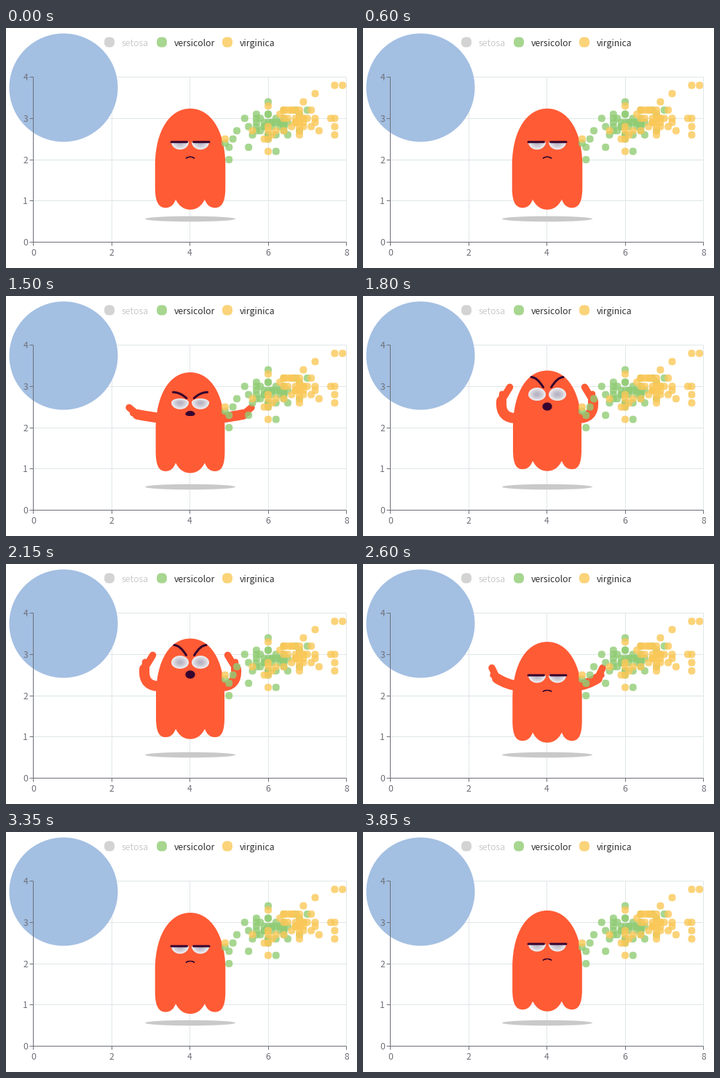
A matplotlib script for the animation above (3900 ms loop, 482 by 330 pixels).

```python
import numpy as np
import matplotlib.pyplot as plt
from matplotlib.animation import FuncAnimation
from matplotlib.patches import Circle, Ellipse, PathPatch
from matplotlib.path import Path

W, H, DPI = 482, 330, 64
PX = 72 / DPI  # points per pixel
STEP, FRAMES = 50, 78
CX = 253

GREEN, YELLOW, GREY = "#91cc75", "#fac858", "#d3d3d3"
BODY, INK, AXIS, GRID = "#ff5b35", "#35052f", "#6e7079", "#e0e6e8"
FONT = "Noto Sans CJK JP"

# time, lift in px, anger, arm raise in degrees, arm reach
KEYS = [(1150, 0, 0, 0, 0), (1250, -5, 0, 0, 0), (1500, 6, 0.35, 9, 1),
        (1750, 8.5, 1, 46, 1), (2250, 8.5, 1, 46, 1), (2600, 4, 0, 20, 0.95),
        (2750, -5, 0, 0, 1), (2900, 0, 0, 0, 0)]


def pose(t):
    """Lift, anger, raise and reach, eased between the keys."""
    keys = np.array(KEYS)
    t = np.clip(t, keys[0, 0], keys[-1, 0])
    i = min(np.searchsorted(keys[:, 0], t, side="right"), len(keys) - 1)
    a, b = keys[i - 1], keys[i]
    u = (t - a[0]) / (b[0] - a[0])
    return (a + (b - a) * u * u * (3 - 2 * u))[1:]


def bob(t):
    phase = min(t, 1100) + 50 if t < 2000 else t - 3350
    weight = np.interp(t, [1150, 1250, 2800, 2950], [1, 0, 0, 1])
    return weight * 2.5 * (1 - np.cos(2 * np.pi * phase / 700))


def iris_cloud(rng, mean, sd, corr, low, high, count):
    """Correlated normal points on a 0.1 grid, kept within a window."""
    cov = corr * sd[0] * sd[1]
    pts = rng.multivariate_normal(mean, [[sd[0] ** 2, cov], [cov, sd[1] ** 2]], 400)
    pts = pts.round(1)
    inside = ((pts >= low) & (pts <= high)).all(axis=1)
    return pts[inside][:count]


def loop(x, y, rx, up, down, power=1.0):
    """Closed oval with its own upper and lower height."""
    a = np.linspace(0, 2 * np.pi, 41)
    c, s = np.cos(a), np.sin(a)
    c, s = (np.sign(v) * np.abs(v) ** power for v in (c, s))
    return np.c_[x + rx * c, y + np.where(s > 0, down, up) * s]


def quad(*pts):
    return Path(pts, [Path.MOVETO, Path.CURVE3, Path.CURVE3])


def body_path(top, bottom, half):
    left = [(0, top), (-28, top), (1 - half, top + 30), (-half, top + 75),
            (-half, top + 90), (-half, bottom - 45), (-half, bottom - 30),
            (-half, bottom - 10), (-43, bottom - 2.5), (-34, bottom - 2.5),
            (-26, bottom - 2.5), (-22, bottom - 8), (-20, bottom - 14),
            (-15, bottom - 4), (-8, bottom), (0, bottom)]
    pts = left + [(-x, y) for x, y in left[-2::-1]]
    return Path(np.array(pts) + (CX, 0), [Path.MOVETO] + [Path.CURVE4] * (len(pts) - 1))


def arm_points(lift_deg, reach):
    """Shoulder, elbow, wrist, fingertip and thumb of the right arm."""
    a, b = np.radians([lift_deg, 20 + 2.2 * lift_deg])
    shoulder = np.array([30 + 10 * reach, 168])
    wrist = shoulder + 33 * reach * np.array([np.cos(a), -np.sin(a)])
    bulge = 0.009 * lift_deg ** 2 * reach
    elbow = (shoulder + wrist) / 2 + bulge * np.array([np.sin(a), np.cos(a)])
    finger = reach * (13 + 0.2 * lift_deg) * np.array([np.cos(b), -np.sin(b)])
    thumb = wrist + 0.4 * finger + 0.2 * np.array([-finger[1], finger[0]])
    return np.array([shoulder, elbow, wrist, wrist + finger, thumb])


fig = plt.figure(figsize=(W / DPI, H / DPI), dpi=DPI, facecolor="white")
ax = fig.add_axes([0, 0, 1, 1])
ax.set(xlim=(0, W), ylim=(H, 0))
ax.axis("off")


def px(v):
    return 37.5 + 53.75 * v


def py(v):
    return 294.5 - 56.75 * v


def line(xs, ys, color, z):
    ax.plot(np.floor(xs) + 0.5, np.floor(ys) + 0.5, color=color, lw=PX, zorder=z,
            solid_capstyle="butt", snap=False)


def label(x, y, text, color, ha):
    ax.text(x, y, text, color=color, ha=ha, va="center_baseline",
            fontsize=12.2 * PX, family=FONT, zorder=4)


def shape(path, **style):
    return ax.add_patch(PathPatch(path, **style))


def dot(x, y, r, color, alpha=0.8):
    shape(Path(loop(x, y, r, r, r, 0.8)), fc=color, lw=0, alpha=alpha, zorder=20)


EMPTY = Path([(0, 0), (0, 0)])


def stroke(width, color, z):
    return shape(EMPTY, fc="none", ec=color, lw=width * PX, zorder=z,
                 capstyle="round", joinstyle="round")


# Chart
for v in range(1, 5):
    line([px(2 * v)] * 2, [py(4), py(0)], GRID, 0)
    line([px(0), px(8)], [py(v)] * 2, GRID, 0)
line([px(0)] * 2, [py(4), py(0)], AXIS, 3)
line([px(0), px(8)], [py(0)] * 2, AXIS, 3)
for v in range(5):
    line([px(0) - 5, px(0)], [py(v)] * 2, AXIS, 3)
    line([px(2 * v)] * 2, [py(0), py(0) + 5], AXIS, 3)
    label(30, py(v) - 0.5, str(v), AXIS, "right")
    label(px(2 * v), 308, str(2 * v), AXIS, "center")

dot(142, 19.5, 7, GREY, 1)
dot(214, 19.5, 7, GREEN)
dot(304, 19.5, 7, YELLOW)
label(159, 20, "setosa", "#cccccc", "left")
label(231, 20, "versicolor", "#333333", "left")
label(321, 20, "virginica", "#333333", "left")

rng = np.random.default_rng(4)
versicolor = iris_cloud(rng, (5.94, 2.77), (0.52, 0.31), 0.53, (5.5, 2.3), (6.9, 3.2), 41)
virginica = iris_cloud(rng, (6.59, 2.97), (0.64, 0.32), 0.46, (5.6, 2.5), (7.3, 3.4), 41)
# Outlying points that set the outline of each cloud
versicolor_rim = [(4.9, 2.4), (5, 2), (5, 2.3), (5.1, 2.5), (5.2, 2.7),
                  (5.4, 3), (6, 3.4), (7, 3.2), (6.2, 2.2)]
virginica_rim = [(4.9, 2.5), (6, 2.2), (7.2, 3.6), (7.7, 3.8), (7.9, 3.8),
                 (7.7, 2.6), (7.7, 2.8), (7.7, 3), (7.6, 3)]
for cloud, rim, color in ((versicolor, versicolor_rim, GREEN),
                          (virginica, virginica_rim, YELLOW)):
    for x, y in [*cloud, *rim]:
        dot(px(x), py(y), 5, color)

ax.add_patch(Circle((79, 82), 74.5, fc="#a3bfe2", lw=0, zorder=1))

# Ghost
ax.add_patch(Ellipse((CX, 262.5), 124, 7.5, fc="#c9c9c9", lw=0, zorder=5))
SIDES = (-1, 1)
RINGS = np.linspace(1, 0.28, 5)
body = shape(EMPTY, fc=BODY, lw=0, zorder=7)
mouth = shape(EMPTY, fc=INK, ec=INK, lw=1.2 * PX, zorder=9)
arms = {s: [stroke(w, BODY, 6) for w in (14, 9.5, 8)] for s in SIDES}
brows = {s: stroke(3, INK, 9) for s in SIDES}
eyes = {s: [shape(EMPTY, fc="#ebe9ed" if r == 1 else "#85819a", lw=0,
                  alpha=1 if r == 1 else 0.15, zorder=8) for r in RINGS]
        for s in SIDES}


def draw(i):
    t = i * STEP
    lift, anger, arm_raise, reach = pose(t)
    lift += bob(t)
    wide = np.sqrt(anger)  # how far the face has opened
    body.set_path(body_path(111 - lift, 250 - 1.1 * lift, 48.3 - 0.15 * lift))

    lips = loop(CX, 177.5 - lift - 17 * wide, 6, 5 * wide, 5 * wide)
    lips[:, 1] += 2 * (1 - wide) * ((lips[:, 0] - CX) / 6) ** 2
    mouth.set_path(Path(lips))

    eye = 157 - lift - 13 * anger
    limb = arm_points(arm_raise, reach)
    for s in SIDES:
        shoulder, elbow, wrist, tip, thumb = limb * (s, 1) + (CX, 0)
        upper, hand, digit = arms[s]
        upper.set_path(quad(shoulder, elbow, wrist))
        hand.set_path(Path([wrist, tip]))
        digit.set_path(Path([wrist, thumb]))

        for patch, r in zip(eyes[s], RINGS):
            patch.set_path(Path(loop(CX + 14 * s, eye, 12 * r, 9.5 * wide * r,
                                     (10.5 - 2 * wide) * r)))
        brows[s].set_path(quad((CX + (26 - 4 * wide) * s, eye - 24 * wide),
                               (CX + 14 * s, eye - 24 * wide),
                               (CX + (4.5 + wide) * s, eye - 10 * wide)))
    return []


anim = FuncAnimation(fig, draw, frames=FRAMES, interval=STEP,
                     init_func=lambda: draw(0), repeat=True, repeat_delay=0)
plt.show()
```
